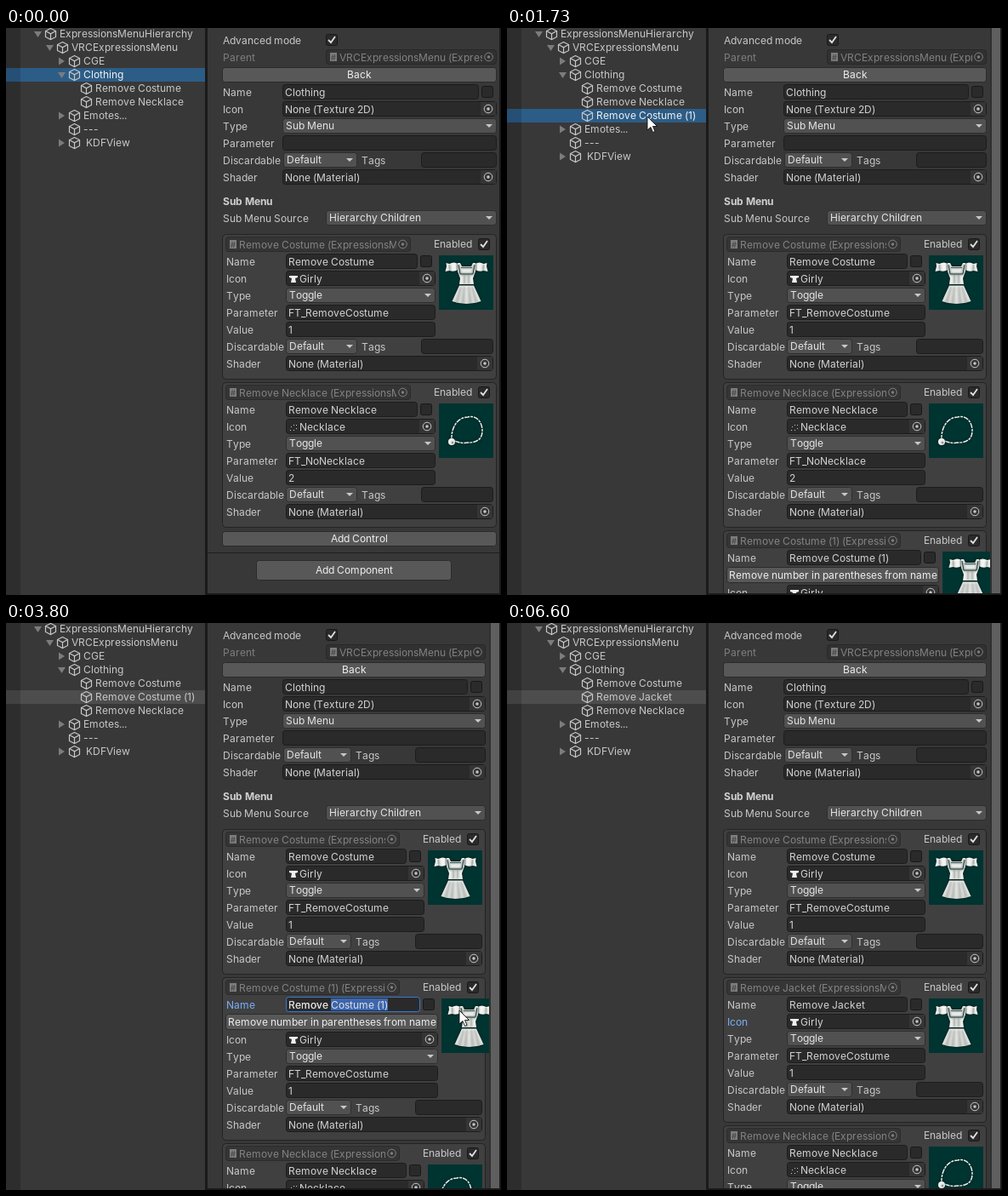
These frames come from a looping animation (582 px wide and 666 px high, 8000 ms). An HTML page with a canvas:

```html
<!DOCTYPE html>
<html lang="en">
<head>
<meta charset="utf-8">
<title>Menu editor</title>
<style>
html, body { margin: 0; width: 582px; height: 666px; overflow: hidden; background: #383838; }
canvas { display: block; }
</style>
</head>
<body>
<canvas id="stage" width="582" height="666"></canvas>
<script>
const ctx = document.getElementById('stage').getContext('2d');
const LOOP = 8000, TICK = 200 / 3;
const FONT = '12px Inter, "Open Sans", sans-serif';
const INK = '#c8c8c8', BLUE = '#7baefa', PANEL = '#383838', FIELD = '#2a2a2a';
let textAreas = [];

// ---------- primitives ----------
function rect(x0, y0, x1, y1, fill) {
  ctx.fillStyle = fill;
  ctx.fillRect(x0, y0, x1 - x0, y1 - y0);
}
function box(x0, y0, x1, y1, fill, edge, r = 3) {
  ctx.beginPath();
  ctx.roundRect(x0 + .5, y0 + .5, x1 - x0 - 1, y1 - y0 - 1, r);
  ctx.fillStyle = fill;
  ctx.fill();
  ctx.strokeStyle = edge;
  ctx.lineWidth = 1;
  ctx.stroke();
}
// Letters advance by whole pixels, as in the editor's hinted text.
const advance = ch => Math.round(ctx.measureText(ch).width);
function textWidth(str, font = FONT) {
  ctx.font = font;
  return [...str].reduce((sum, ch) => sum + advance(ch), 0);
}
function text(str, x, cy, color = INK, maxX = 0, font = FONT) {
  ctx.save();
  if (maxX) {
    ctx.beginPath();
    ctx.rect(x - 2, cy - 10, maxX - x + 2, 20);
    ctx.clip();
  }
  ctx.font = font;
  ctx.fillStyle = color;
  let pen = Math.round(x);
  for (const ch of str) {
    ctx.fillText(ch, pen, Math.round(cy + 4));
    pen += advance(ch);
  }
  ctx.restore();
}
function shape(points, fill) {
  ctx.beginPath();
  points.forEach(([x, y]) => ctx.lineTo(x, y));
  ctx.closePath();
  ctx.fillStyle = fill;
  ctx.fill();
}
function line(points, color, width = 1) {
  ctx.beginPath();
  points.forEach(([x, y]) => ctx.lineTo(x, y));
  ctx.strokeStyle = color;
  ctx.lineWidth = width;
  ctx.stroke();
}
function dot(x, y, r, color) {
  ctx.beginPath();
  ctx.arc(x, y, r, 0, 7);
  ctx.fillStyle = color;
  ctx.fill();
}

// ---------- widgets (cy is the row centre) ----------
function button(label, x0, y0, x1, y1) {
  box(x0, y0, x1, y1, '#585858', '#2b2b2b');
  text(label, (x0 + x1 - textWidth(label)) / 2, (y0 + y1) / 2, '#eeeeee');
}
function field(x0, x1, cy, value = '', focus = false) {
  box(x0, cy - 9, x1, cy + 9, FIELD, focus ? '#3a79d0' : '#1c1c1c');
  text(value, x0 + 3, cy + 1, '#d2d2d2', x1 - 3);
  textAreas.push([x0, cy - 9, x1, cy + 9]);
}
function picker(x, cy) {
  ctx.beginPath();
  ctx.arc(x, cy, 4.8, 0, 7);
  ctx.strokeStyle = INK;
  ctx.lineWidth = 1;
  ctx.stroke();
  dot(x, cy, 1.7, INK);
}
function objectField(x0, x1, cy, value, icon) {
  box(x0, cy - 9, x1, cy + 9, FIELD, '#1c1c1c');
  rect(x1 - 19, cy - 8, x1 - 1, cy + 8, '#353535');
  if (icon) miniIcon(icon, x0 + 4, cy - 4);
  text(value, x0 + (icon ? 15.5 : 3), cy + 1, '#d2d2d2', x1 - 20);
  picker(x1 - 10, cy);
}
function scriptField(x0, x1, cy, value) {
  ctx.save();
  ctx.globalAlpha = .5;
  box(x0, cy - 9, x1, cy + 9, FIELD, '#1c1c1c');
  rect(x0 + 5, cy - 5, x0 + 13, cy + 5, '#c8c8c8');
  text('#', x0 + 6, cy, '#222222', 0, 'bold 9px Inter, sans-serif');
  text(value, x0 + 15.5, cy + 1, '#d2d2d2', x1 - 17);
  picker(x1 - 9.5, cy);
  ctx.restore();
}
function dropdown(x0, x1, cy, value) {
  box(x0, cy - 9, x1, cy + 9, '#515151', '#2e2e2e');
  text(value, x0 + 4, cy, '#e4e4e4');
  shape([[x1 - 13, cy - 2], [x1 - 5, cy - 2], [x1 - 9, cy + 2]], INK);
}
function checkbox(x, cy, on) {
  box(x, cy - 7, x + 14, cy + 7, FIELD, '#181818', 2);
  if (on) line([[x + 3, cy], [x + 6, cy + 3], [x + 11, cy - 4]], '#e0e0e0', 1.8);
}

// ---------- icons ----------
function cube(x, cy) {
  const y = cy;
  line([[x, y - 6.5], [x + 6, y - 3.5], [x + 6, y + 3.5], [x, y + 6.5],
        [x - 6, y + 3.5], [x - 6, y - 3.5], [x, y - 6.5]], INK, 1.2);
  line([[x - 6, y - 3.5], [x, y - .3], [x + 6, y - 3.5]], INK, 1.2);
  line([[x, y], [x, y + 6.5]], INK, 1.2);
}
function miniIcon(kind, x, y) {
  if (kind === 'dress') {
    shape([[x, y + 1], [x + 10, y + 1], [x + 10, y + 3], [x + 7, y + 4], [x + 8, y + 9],
           [x + 2, y + 9], [x + 3, y + 4], [x, y + 3]], '#f0f0f0');
  } else {
    [[1, 8], [2, 4], [5, 2], [8, 2], [8, 6], [5, 8]].forEach(([a, b]) => rect(x + a, y + b, x + a + 1, y + b + 1, '#cccccc'));
  }
}
function dress() {
  const seam = '#1f4441';
  for (const side of [1, -1]) {
    ctx.save();
    ctx.translate(32.5, 0);
    ctx.scale(side, 1);
    ctx.beginPath();
    ctx.moveTo(10, 10);
    ctx.quadraticCurveTo(15, 7, 20, 10);
    ctx.lineTo(24, 9);
    ctx.lineTo(23.5, 13);
    ctx.lineTo(25, 19);
    ctx.lineTo(20, 18);
    ctx.quadraticCurveTo(15, 20, 10, 17);
    ctx.fillStyle = '#f4f5f2';
    ctx.fill();
    line([[20, 11], [19.5, 18]], '#9aa5a2', .8);
    ctx.restore();
  }
  shape([[22, 9], [25, 9], [27, 13], [38, 13], [40, 9], [43, 9], [43, 19], [40, 27], [41, 34],
         [24, 34], [25, 27], [22, 19]], '#eff1ed');
  ctx.beginPath();
  ctx.moveTo(24, 35.5);
  ctx.lineTo(41, 35.5);
  ctx.lineTo(49.5, 54);
  ctx.quadraticCurveTo(32.5, 60, 15.5, 54);
  const skirt = ctx.createLinearGradient(0, 34, 0, 58);
  skirt.addColorStop(0, '#f5f5f2');
  skirt.addColorStop(1, '#d8dad6');
  ctx.fillStyle = skirt;
  ctx.fill();
  line([[23, 11], [25, 22], [40, 22], [42, 11]], seam, 1);
  line([[26, 14.5], [39, 14.5]], seam, .8);
  [30, 35].forEach(x => line([[x, 23], [x, 33]], '#a9b1ae', .7));
  [26, 30, 35, 39].forEach(x => line([[x, 37], [32.5 + (x - 32.5) * 1.8, 56]], '#c3c7c3', .7));
}
function necklace() {
  ctx.beginPath();
  ctx.moveTo(15, 43);
  ctx.bezierCurveTo(14, 30, 21, 16, 34, 16);
  ctx.bezierCurveTo(46, 13, 51, 24, 51, 32);
  ctx.bezierCurveTo(51, 44, 42, 46, 34, 46);
  ctx.bezierCurveTo(27, 47, 24, 46, 18, 44);
  ctx.strokeStyle = '#e8efec';
  ctx.lineWidth = 1.5;
  ctx.setLineDash([6, 1, 3, 1]);
  ctx.stroke();
  ctx.setLineDash([]);
  dot(15, 45, 4, '#f2f4f2');
  dot(16, 46, 1, '#718482');
}
function picture(kind, x, y) {
  ctx.save();
  ctx.translate(x, y);
  rect(0, 0, 64, 64, '#003431');
  ctx.beginPath();
  ctx.rect(0, 0, 64, 64);
  ctx.clip();
  ctx.shadowColor = '#001413';
  ctx.shadowBlur = 3;
  kind === 'dress' ? dress() : necklace();
  ctx.restore();
}

// ---------- hierarchy ----------
function hierarchy(s) {
  rect(0, 0, 234, 666, PANEL);
  rect(0, 0, 17, 666, '#2d2d2d');
  const rows = [
    [0, 'ExpressionsMenuHierarchy', 'open'], [1, 'VRCExpressionsMenu', 'open'],
    [2, 'CGE', 'shut'], [2, 'Clothing', 'open'],
    ...s.tree.map(name => [3, name]),
    [2, 'Emotes...', 'shut'], [2, '---'], [2, ' KDFView', 'shut']
  ];
  const top = s.selected * 16 - 1;
  rect(0, top, 17, top + 16, s.treeFocus ? '#264f75' : '#414141');
  rect(17, top, 234, top + 16, s.treeFocus ? '#2c5d87' : '#4d4d4d');
  rows.forEach(([depth, name, arrow], i) => {
    const cy = 7 + 16 * i, x = 52 + 14 * depth;
    if (arrow === 'open') shape([[x - 19, cy - 3], [x - 10, cy - 3], [x - 14.5, cy + 4]], '#7c7c7c');
    if (arrow === 'shut') shape([[x - 18, cy - 4.5], [x - 11, cy], [x - 18, cy + 4.5]], '#7c7c7c');
    cube(x + .5, cy);
    text(name, x + 11, cy, i === s.selected && s.treeFocus ? '#f0f0f0' : INK);
  });
  if (s.dropLine) {
    rect(91, 78, 234, 80, '#4f90d0');
    ctx.beginPath();
    ctx.arc(88, 79, 2.5, 0, 7);
    ctx.strokeStyle = '#4f90d0';
    ctx.lineWidth = 1.2;
    ctx.stroke();
  }
}

// ---------- inspector ----------
function discardRow(x0, cy, end, shift) {
  const half = Math.ceil(shift / 2);
  dropdown(x0, 413 - half, cy, 'Default');
  text('Tags', 418 - half, cy + 1);
  field(488 - half, end, cy);
}
function itemCard(item, y, shift, s) {
  const numbered = / \(\d+\)$/.test(item.name);
  const extra = numbered ? 21 : 0, grow = numbered ? 16 : 0;
  const end = 505 - shift + grow, nameEnd = 484 - shift + grow;
  const right = 577 - shift, bottom = y + extra;
  const row = k => (k > 1 ? bottom : y) + 20 * k;
  const nameOn = item.edited && s.focus === 'name';
  const iconOn = item.edited && s.focus === 'icon';

  box(254, y - 12, right, bottom + 159, '#404040', '#232323', 4);
  scriptField(258, 476 - shift, y, item.name + ' (ExpressionsMenuItem)');
  text('Enabled', 503 - shift, y);
  checkbox(555 - shift, y, true);
  ['Name', 'Icon', 'Type', 'Parameter', 'Value', 'Discardable', 'Shader'].forEach((label, i) => {
    const lit = nameOn && i === 0 || iconOn && i === 1;
    text(label, 259, row(i + 1) + 1, lit ? BLUE : INK);
  });

  field(329, nameEnd, row(1), item.name, nameOn);
  if (nameOn) nameEdit(item.name, row(1), s);
  checkbox(nameEnd + 3, row(1), false);
  ctx.save();
  ctx.beginPath();
  ctx.rect(0, 0, shift ? 568 : 580, 666);
  ctx.clip();
  picture(item.icon, 509 - shift + grow, y + 13);
  ctx.restore();
  if (numbered) button('Remove number in parentheses from name', 258, y + 31, 508, y + 50);

  objectField(329, end, row(2), item.icon === 'dress' ? 'Girly' : 'Necklace', item.icon);
  dropdown(329, end, row(3), 'Toggle');
  field(329, end, row(4), item.param);
  field(329, end, row(5), item.value);
  discardRow(329, row(6), 573 - shift, shift);
  objectField(329, 573 - shift, row(7), 'None (Material)');
  return 174 + extra;
}
function nameEdit(name, cy, s) {
  const at = n => 332 + textWidth(name.slice(0, n));
  const selecting = s.t < 4330;
  const from = selecting ? 7 : name.length;
  let to = from;
  while (to < name.length && (at(to) + at(to + 1)) / 2 < s.cursor[0]) to++;
  if (to > from) {
    rect(at(from), cy - 7, at(to), cy + 7, '#3d66ad');
    text(name, 332, cy + 1, '#e0e0e0');
  } else {
    rect(at(from), cy - 7, at(from) + 1, cy + 7, '#d0d0d0');
  }
}
function inspector(s) {
  const shift = s.items.length > 2 ? 13 : 0;
  const right = 577 - shift;
  rect(234, 0, 582, 666, '#1a1a1a');
  rect(237, 0, 580, 664, PANEL);
  ctx.save();
  ctx.beginPath();
  ctx.rect(237, 0, 343, 664);
  ctx.clip();

  text('Advanced mode', 255, 15);
  checkbox(376, 14, true);
  text('Parent', 255, 35, '#7e7e7e');
  scriptField(376, right, 34, 'VRCExpressionsMenu (ExpressionsMenuRoot)');
  button('Back', 254, 46, right, 64);
  ['Name', 'Icon', 'Type', 'Parameter', 'Discardable', 'Shader']
    .forEach((label, i) => text(label, 255, 76 + 20 * i));
  field(325, 556 - shift, 75, 'Clothing');
  checkbox(559 - shift, 75, false);
  objectField(325, right, 95, 'None (Texture 2D)');
  dropdown(325, right, 115, 'Sub Menu');
  field(325, right, 135);
  discardRow(326, 155, right, shift);
  objectField(325, right, 175, 'None (Material)');
  text('Sub Menu', 255, 204, '#d0d0d0', 0, 'bold ' + FONT);
  text('Sub Menu Source', 255, 224);
  dropdown(376, right, 223, 'Hierarchy Children');

  let y = 254;
  for (const item of s.items) y += itemCard(item, y, shift, s);
  button('Add Control', 254, y - 11, right, y + 7);
  rect(237, y + 14, 580, y + 15, '#1f1f1f');
  button('Add Component', 294, y + 23, 524, y + 47);

  if (shift) {
    rect(568, 0, 580, 664, '#303030');
    rect(570, 0, 580, 664, '#5f5f5f');
  }
  ctx.restore();
}

// ---------- pointer ----------
const PATH = [
  [130, 328, 100], [670, 152, 70], [1130, 152, 70], [1700, 165, 104], [1830, 165, 104],
  [2000, 166, 82], [2270, 166, 82], [2730, 434, 340], [3070, 381, 449], [3130, 381, 449],
  [3800, 533, 455], [5200, 533, 455], [5560, 380, 541], [5930, 266, 467], [6060, 266, 467], [6600, 582, 391]
];
function pointerAt(t) {
  const i = PATH.findIndex(p => p[0] > t);
  if (i < 0) return PATH[PATH.length - 1].slice(1);
  if (i === 0) return PATH[0].slice(1);
  const [t0, x0, y0] = PATH[i - 1], [t1, x1, y1] = PATH[i];
  const u = (t - t0) / (t1 - t0), e = u * u * (3 - 2 * u);
  return [x0 + (x1 - x0) * e, y0 + (y1 - y0) * e];
}
function pointer([px, py]) {
  const x = Math.round(px), y = Math.round(py);
  if (textAreas.some(([a, b, c, d]) => x > a && x < c && y > b && y < d)) {
    const bar = dy => [[x - 3, y + dy], [x + 4, y + dy]];
    [bar(-7.5), bar(7.5), [[x + .5, y - 7], [x + .5, y + 7]]].forEach(p => line(p, '#e8e8e8'));
    return;
  }
  shape([[0, 0], [0, 16], [4, 12.5], [6.5, 18.5], [9, 17.5], [6.5, 11.5], [11.5, 11.5]]
    .map(([a, b]) => [x + a, y + b]), '#ffffff');
  ctx.strokeStyle = '#111111';
  ctx.lineWidth = .9;
  ctx.stroke();
}

// ---------- timeline ----------
function typed(t, times) {
  const n = times.filter(k => t >= k).length;
  return n ? 'Remove ' + 'Jacket'.slice(0, n) : 'Remove Costume (1)';
}
function stateAt(t) {
  const costume = { name: 'Remove Costume', icon: 'dress', param: 'FT_RemoveCostume', value: '1' };
  const chain = { name: 'Remove Necklace', icon: 'necklace', param: 'FT_NoNecklace', value: '2' };
  const copy = { ...costume, name: typed(t, [4330, 4460, 4590, 4720, 4860, 5120]), edited: true };
  const treeName = typed(t, [4460, 4460, 4590, 4720, 4925, 5190]);
  const items = t < 1000 ? [costume, chain] : t < 2270 ? [costume, chain, copy] : [costume, copy, chain];
  return {
    t, items,
    tree: items.map(i => i === copy ? treeName : i.name),
    selected: t < 665 ? 3 : t < 1000 ? 4 : t < 2270 ? 6 : 5,
    treeFocus: t < 3130,
    focus: t < 3130 ? '' : t < 6000 ? 'name' : 'icon',
    dropLine: t >= 1930 && t < 2270,
    cursor: pointerAt(t)
  };
}
function draw(t) {
  const s = stateAt(t);
  textAreas = [];
  inspector(s);
  hierarchy(s);
  if (t >= 130 && t < 6599) pointer(s.cursor);
}
const start = performance.now();
let shown = -1;
(function frame() {
  const now = (performance.now() - start) % LOOP;
  const t = Math.floor((now + 7) / TICK) * TICK % LOOP;
  if (t !== shown) draw(shown = t);
  requestAnimationFrame(frame);
})();
</script>
</body>
</html>
```
